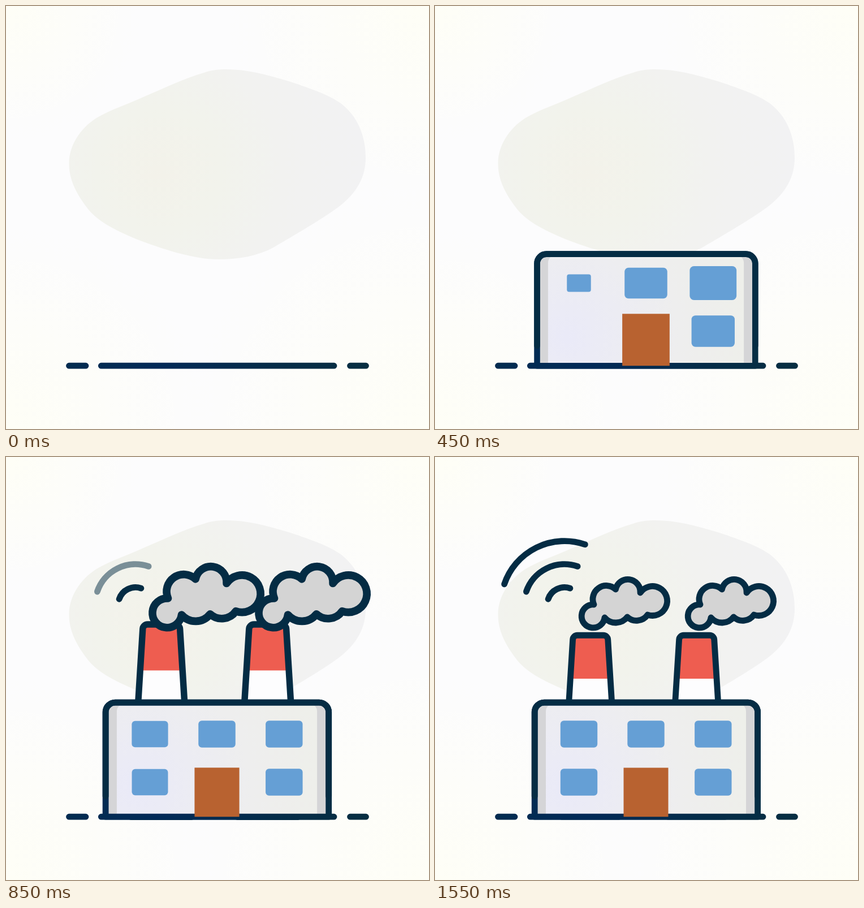
Write an HTML page with a canvas that moves like this. It is 748 px wide and 748 px high and loops after 1600 ms.

```html
<!DOCTYPE html>
<html lang="en">
<head>
<meta charset="utf-8">
<title>Factory</title>
<style>
  html, body { margin: 0; width: 100%; height: 100%; overflow: hidden; background: #fdfdfc; }
  canvas { display: block; width: 748px; height: 748px; }
</style>
</head>
<body>
<canvas id="stage" width="748" height="748"></canvas>
<script>
const ctx = document.getElementById('stage').getContext('2d');
const SIZE = 748, LOOP = 1600, STEP = 50;
const GROUND = 636.2, LINE = 10.8, INK = '#042c44';

const blob = new Path2D(`M390 112 C425 112 460 121 500 133 C545 148 570 157 592 172
  C622 195 636 230 636 268 C636 303 620 328 597 348 C575 368 500 411 473 427
  C445 442 412 448 376 448 C330 448 275 429 230 412 C190 395 160 380 142 355
  C122 328 111.5 305 111.5 278 C111.5 248 130 217 160 198 C185 183 215 174 245 160
  C280 145 318 127 350 118 C363 113 376 112 390 112Z`);

const cloud = new Path2D(`M281 261 A24 24 0 0 1 319.5 234 A22 22 0 0 1 363 240
  A26 26 0 1 1 376 279 A24 24 0 0 1 340 283 A25.8 25.8 0 0 1 300 284
  A20.5 20.5 0 1 1 281 261Z`);

const windows = [
  { x: 254.5, y: 490, end: 478 },
  { x: 373, y: 490, end: 298 },
  { x: 491.8, y: 490, end: 352 },
  { x: 254.5, y: 575, end: 540 },
  { x: 491.8, y: 575, end: 304 }
];

const waves = [
  { r: 30.5, start: 750 },
  { r: 71.4, start: 800 },
  { r: 112.4, start: 850 }
];

function gradient(g, stops) {
  stops.forEach(([at, color]) => g.addColorStop(at, color));
  return g;
}
const radial = (x, y, r, stops) => gradient(ctx.createRadialGradient(x, y, 0, x, y, r), stops);

const blobFill = radial(270, 290, 360,
  [[0, '#f3f2ea'], [.3, '#f2f3ec'], [.6, '#f2f2f0'], [1, '#f2f2f3']]);
const wallFill = radial(230, 585, 340,
  [[0, '#eaeaf8'], [.6, '#eeeeee'], [1, '#eeefea']]);
const groundInk = gradient(ctx.createLinearGradient(106, 0, 642, 0),
  [[0, '#022c50'], [.3, '#012a58'], [.7, '#042c48'], [1, '#062e42']]);
const corners = [[0, 0, 240], [SIZE, 0, 360], [0, SIZE, 360], [SIZE, SIZE, 430]].map(
  ([x, y, r]) => radial(x, y, r, [[0, 'rgba(254,254,246,1)'], [1, 'rgba(254,254,246,0)']]));

// Linear growth to full size, then a decaying 2 Hz wobble.
function pop(t, end, rise = 140) {
  const after = (t - end) / 1000;
  if (after < 0) return Math.max(0, 1 + (t - end) / rise);
  return 1 + .75 * Math.sin(4 * Math.PI * after) * Math.exp(-10 * after);
}

function scaled(x, y, s, draw) {
  if (s <= 0) return;
  ctx.save();
  ctx.translate(x, y);
  ctx.scale(s, s);
  ctx.translate(-x, -y);
  draw();
  ctx.restore();
}

function rect(x, y, w, h, color) {
  ctx.fillStyle = color;
  ctx.fillRect(x, y, w, h);
}

function backdrop() {
  rect(0, 0, SIZE, SIZE, '#fcfcfd');
  corners.forEach(c => rect(0, 0, SIZE, SIZE, c));
  ctx.fillStyle = blobFill;
  ctx.fill(blob);
  ctx.strokeStyle = groundInk;
  ctx.beginPath();
  [[111.5, 141], [168.3, 580], [608.5, 636.5]].forEach(([a, b]) => {
    ctx.moveTo(a, GROUND);
    ctx.lineTo(b, GROUND);
  });
  ctx.stroke();
}

function chimney(x) {
  const top = 315.2, shape = new Path2D();
  shape.moveTo(x - 50.5, GROUND);
  shape.arcTo(x - 30.6, top, x, top, 8);
  shape.arcTo(x + 30.6, top, x + 50.5, GROUND, 8);
  shape.lineTo(x + 50.5, GROUND);
  shape.closePath();
  ctx.save();
  ctx.clip(shape);
  rect(x - 60, top, 120, 330, '#fdfdfe');
  rect(x - 60, top, 120, 392 - top, '#ee5d50');
  ctx.restore();
  ctx.strokeStyle = INK;
  ctx.stroke(shape);
}

function building() {
  const box = new Path2D(), panel = new Path2D();
  box.roundRect(176.2, 434.2, 394.4, GROUND - 434.2, [17, 17, 0, 0]);
  panel.roundRect(196, 436, 354, GROUND - 436, [14, 14, 0, 0]);
  ctx.fillStyle = '#d5d5d7';
  ctx.fill(box);
  ctx.fillStyle = wallFill;
  ctx.fill(panel);
  ctx.strokeStyle = groundInk;
  ctx.stroke(box);
  ctx.strokeStyle = INK;
  ctx.beginPath();
  ctx.moveTo(176.2, 600);
  ctx.arcTo(176.2, 434.2, 373, 434.2, 17);
  ctx.arcTo(570.6, 434.2, 570.6, 600, 17);
  ctx.lineTo(570.6, 600);
  ctx.stroke();
}

function pane(x, y) {
  ctx.fillStyle = '#659fd5';
  ctx.beginPath();
  ctx.roundRect(x - 32.7, y - 23.7, 65.4, 47.4, 6);
  ctx.fill();
}

function smoke(dx) {
  ctx.translate(dx, 0);
  ctx.fillStyle = '#d4d4d4';
  ctx.fill(cloud);
  ctx.strokeStyle = INK;
  ctx.stroke(cloud);
}

function wave(r, alpha) {
  ctx.globalAlpha = alpha;
  ctx.strokeStyle = INK;
  ctx.beginPath();
  ctx.arc(229, 261, r, Math.PI * 1.104, Math.PI * 1.605);
  ctx.stroke();
  ctx.globalAlpha = 1;
}

function render(t) {
  ctx.lineWidth = LINE;
  ctx.lineCap = ctx.lineJoin = 'round';
  backdrop();
  for (const x of [274.7, 462.7]) scaled(x, GROUND, pop(t, 650), () => chimney(x));
  scaled(373.4, GROUND, pop(t, 150), building);
  for (const { x, y, end } of windows) scaled(x, y, pop(t, end, 80), () => pane(x, y));
  scaled(373, GROUND, pop(t, 250), () => rect(333.5, 549.5, 79, 86.7, '#b86230'));
  for (const dx of [0, 188]) scaled(260 + dx, 303, pop(t, 750), () => smoke(dx));
  for (const { r, start } of waves) {
    const alpha = Math.min(1, (t - start) / 100);
    if (alpha > 0) wave(r, alpha);
  }
}

function tick() {
  const t = performance.now() % LOOP;
  render(Math.floor(t / STEP) * STEP);
  requestAnimationFrame(tick);
}
tick();
</script>
</body>
</html>
```
